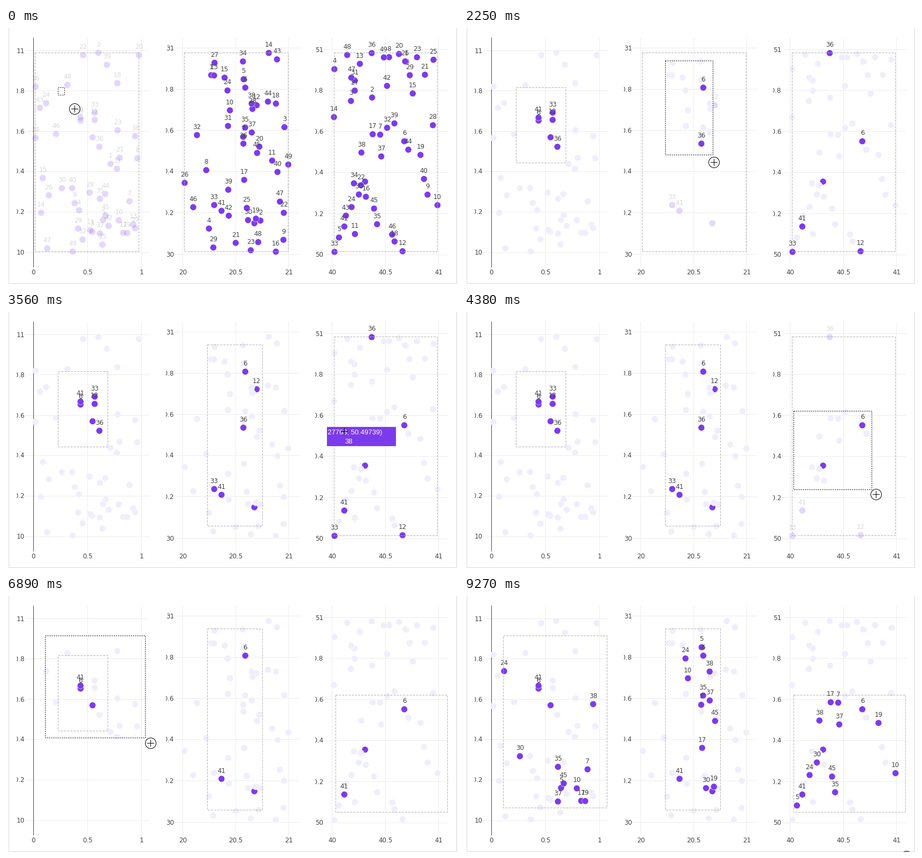
Animation of 845x479 px, one loop 9.37 s. Source, as a matplotlib script:

```python
import numpy as np
import matplotlib.pyplot as plt
from matplotlib.animation import FuncAnimation
from matplotlib.patches import Circle, Rectangle

W, H, DPI = 845, 479, 64
PX = 72 / DPI  # one pixel in points
LOOP, STEPS, SUB = 9370, 79, 3
N = 50
PURPLE, FAINT, INK = (124 / 255, 58 / 255, 237 / 255), (0.94, 0.932, 0.992), "#444444"

# Per panel: x of first tick, pixels per unit in x, y of last tick, pixels per unit in y
SCALES = [(51.2, 201.6, 420, 378), (330.2, 197.8, 423, 385.7), (609, 199.6, 424, 384)]

# Six columns of random data, drawn as three scatter plots
np.random.seed(0)
columns = np.random.rand(6, N)
POINTS = [np.column_stack([x0 + xu * columns[2 * p], y0 - yu * columns[2 * p + 1]])
          for p, (x0, xu, y0, yu) in enumerate(SCALES)]

# Boxes as x0, y0, x1, y1
FULL = [(*p.min(0), *p.max(0)) for p in POINTS]
BOX_A, BOX_B = (97, 111, 190, 252), (376, 61, 479, 400)
BOX_C, BOX_D = (616, 185, 825, 404), (73, 74, 267, 396)

# (first step, last step, panel, final box)
DRAGS = [(0, 7, 0, BOX_A), (16, 24, 1, BOX_B), (33, 45, 2, BOX_C), (54, 65, 0, BOX_D)]
# (first step, box) kept on each panel
KEPT = [[(0, FULL[0]), (8, BOX_A), (66, BOX_D)],
        [(0, FULL[1]), (25, BOX_B)],
        [(0, FULL[2]), (46, BOX_C)]]

# Key points of the pointer: step, x, y
PATH = np.array([
    (-0.25, 109, 125), (0, 128, 151), (5, 191, 252), (7.5, 191, 252), (10, 361, 135),
    (15, 376, 61), (18.75, 465, 237), (19, 467, 251), (23, 479, 400), (25, 490, 385),
    (28, 690, 258), (30, 632, 223), (32, 616, 185), (39, 832, 403), (40, 832, 403),
    (41, 832, 412), (48, 832, 412), (49, 746, 364), (52, 308, 75), (53, 73, 74),
    (61, 388, 396), (66, 386, 397), (70, 470, 495), (77, 827, 500), (78, 827, 487)])


def pointer(k):
    return [np.interp(k, PATH[:, 0], PATH[:, c]) for c in (1, 2)]


def inside(points, box):
    x, y = points.T
    return (x >= box[0]) & (x <= box[2]) & (y >= box[1]) & (y <= box[3])


def chosen(*boxes):
    return np.all([inside(p, b) for p, b in zip(POINTS, boxes)], axis=0)


# Each selection reaches the three panels at its own steps
SELECTIONS = [((0, 0, 0), chosen(*FULL)),
              ((8, 9, 9), chosen(BOX_A, *FULL[1:])),
              ((43, 44, 46), chosen(BOX_A, BOX_B, BOX_C)),
              ((66, 68, 66), chosen(BOX_D, BOX_B, BOX_C))]
PICKS = [[(starts[p], picked) for starts, picked in SELECTIONS] for p in range(3)]


def latest(track, k):
    return [value for start, value in track if start <= k][-1]


fig = plt.figure(figsize=(W / DPI, H / DPI), dpi=DPI, facecolor="white")
ax = fig.add_axes([0, 0, 1, 1])
ax.set(xlim=(0, W), ylim=(H, 0))
ax.axis("off")


def line(xs, ys, color, z=1, **kw):
    return ax.plot(xs, ys, color=color, lw=PX, zorder=z, **kw)[0]


def label(x, y, s, ha="center", color=INK, z=4, font="DejaVu Sans", size=12):
    return ax.text(x, y, s, ha=ha, va="baseline", color=color, zorder=z,
                   family=font, size=size * PX)


def block(x, y, w, h, color, z):
    return ax.add_patch(Rectangle((x, y), w, h, fc=color, lw=0, zorder=z))


def dashed(color, dash, z):
    return line([], [], color, z, linestyle=(0, dash), dash_capstyle="butt")


def place(art, box):
    x0, y0, x1, y1 = np.floor(box)
    art.set_data([x0, x1, x1, x0, x0], [y0, y0, y1, y1, y0])


def draw_axes(p, x0, xu, y0, yu):
    left = int(x0) - 15
    for v in (0, 0.5, 1):
        x = int(x0 + v * xu + 0.2)
        zero = p == 0 and v == 0
        line([x, x], [18, 447], INK if zero else "#ececec", 1.5 if zero else 1)
        label(x + 0.5, 461, f"{20 * p + v:g}")
    for v in np.arange(6) / 5:
        y = int(y0 - v * yu)
        line([left, left + 232], [y, y], "#ececec")
        label(left - 1, y + 4.5, f"{20 * p + 10 + v:g}", "right")
    # the tick labels are cut off on the left
    block(left - 34, 18, 18, 420, "white", 5)


for p, scale in enumerate(SCALES):
    draw_axes(p, *scale)
line([5, 5, 842, 842], [-1, 478, 478, -1], "#d6d6d6", 6)

dots, tags, kept = [], [], []
for pts in POINTS:
    dots.append(ax.scatter(*pts.T, s=(12 * PX) ** 2, lw=PX / 2, zorder=2))
    tags.append([label(x, y - 11.5, str(n) if n else "") for n, (x, y) in enumerate(pts)])
    kept.append(dashed("#b0b0b0", (4, 2), 6))
under = line([], [], "white", 6)
rubber = dashed("black", (2, 2), 6.1)

x, y = columns[4:, 38]
white = dict(color="white", z=8, font="Liberation Sans", size=13)
tip = [block(600, 215, 129, 36, PURPLE, 7),
       label(641, 229, f"({40 + x:.5f}, {50 + y:.5f})", **white),
       label(641, 246, "38", **white)]

cross = [line([], [], "black", 9), line([], [], "black", 9)]
ring = ax.add_patch(Circle((0, 0), 10, fill=False, ec="black", lw=PX, zorder=9))


def paint(p, picked, live):
    """Colour one panel; items outside a live box fade."""
    near = np.ones(N, bool) if live is None else inside(POINTS[p], live)
    fade = np.where(near, 1, 0.2)
    alpha = np.where(picked | near, fade, 0)[:, None]
    fill = np.where(picked[:, None], PURPLE, FAINT)
    dots[p].set_facecolors(np.hstack([fill, alpha]))
    dots[p].set_edgecolors(np.hstack([np.ones((N, 3)), alpha]))
    for tag, on, a in zip(tags[p], picked, fade):
        tag.set_visible(bool(on))
        tag.set_alpha(a)


def update(i):
    k = min((i + 1) // SUB, STEPS - 1)
    drag = next((d for d in DRAGS if d[0] <= k <= d[1]), None)
    live = None
    if drag:
        x, y = pointer(k - 0.25)  # the box lags a little
        x0, y0, x1, y1 = drag[3]
        live = (x0, y0, min(x, x1), min(y, y1))
        place(under, live)
        place(rubber, live)
    under.set_visible(drag is not None)
    rubber.set_visible(drag is not None)

    for p in range(3):
        paint(p, latest(PICKS[p], k), live if drag and drag[2] == p else None)
        place(kept[p], latest(KEPT[p], k))

    for art in tip:
        art.set_visible(k in (29, 30))
    x, y = (int(round(v)) for v in pointer(k))
    cross[0].set_data([x - 6, x + 6], [y, y])
    cross[1].set_data([x, x], [y - 6, y + 6])
    ring.center = (x + 0.5, y + 0.5)
    ring.set_visible(drag is not None or 46 <= k <= 48 or k == STEPS - 1)
    return []


FRAMES = STEPS * SUB
anim = FuncAnimation(fig, update, frames=FRAMES, interval=LOOP / FRAMES,
                     init_func=lambda: update(0), repeat=True, repeat_delay=0, blit=False)
plt.show()
```
